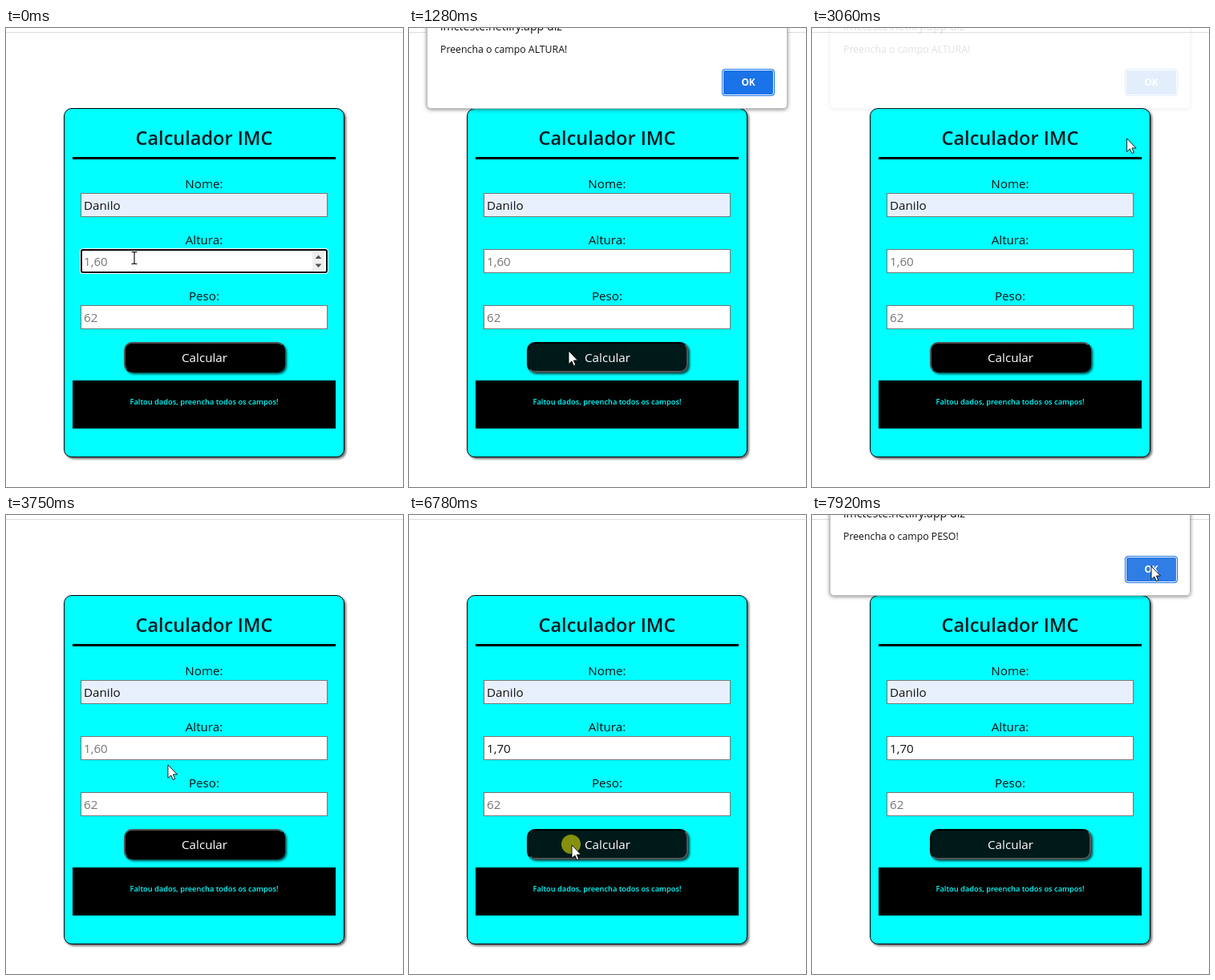
These frames come from a looping animation (495x573 px, 8000 ms). An HTML page:

```html
<!DOCTYPE html>
<html lang="pt-BR">
<head>
<meta charset="utf-8">
<title>Calculador IMC</title>
<style>
html, body { margin: 0; width: 100%; height: 100%; overflow: hidden; background: #fff; }
#stage { position: relative; width: 495px; height: 573px; overflow: hidden;
  font: 15.2px "Open Sans", "Noto Sans", sans-serif; color: #111; }
#stage div, #stage svg { position: absolute; box-sizing: border-box; white-space: pre; }
#topLine { top: 5px; width: 495px; height: 1px; background: #ddd; }
#card { left: 72px; top: 100px; width: 350px; height: 436px; background: #0ff;
  border: 1px solid #000; border-radius: 10px; box-shadow: 2px 2px 3px #0009; }
.center { left: 72px; width: 350px; text-align: center; line-height: 20px; }
#title { top: 127px; font-size: 23.5px; font-weight: 600; color: #0b1a20; }
#rule { left: 83px; top: 161px; width: 328px; height: 3px; background: #000; }
.field { left: 93px; width: 308px; height: 30px; border: 1px solid #767676;
  padding-left: 3px; line-height: 28px; background: #fff; }
.field.focus { border: 2px solid #000; padding-left: 2px; line-height: 26px;
  border-radius: 3px; box-shadow: 0 0 0 1px #fff; }
.hint { color: #757575; }
#caret { display: inline-block; width: 1px; height: 20px; margin-right: -1px;
  background: #000; vertical-align: middle; }
.spinner { left: 382px; width: 15px; height: 24px; }
#button { left: 147px; top: 392px; width: 201px; height: 38px; border: 2px outset #000;
  border-radius: 10px; background: #000; color: #fff; text-align: center;
  line-height: 34px; box-shadow: 2px 2px 3px #000b; }
#button.pressed { border-style: inset; background: #001a1a; }
#result { left: 83px; top: 440px; width: 328px; height: 60px; background: #000; color: #0ff;
  text-align: center; font-size: 9.3px; font-weight: 600; line-height: 54px; }
#dialog { left: 22px; top: -40px; width: 450px; height: 141px; background: #fff;
  border: 1px solid #bbb; border-radius: 5px; box-shadow: 0 1px 5px #0007; }
#dialog div { left: 16px; line-height: 20px; }
#site { top: 27px; font-size: 14.2px; }
#alertText { top: 56px; font-size: 12.3px; }
#stage #ok { left: 367px; top: 90px; width: 66px; height: 34px; border: 1.5px solid #1a73e8;
  border-radius: 4px; box-shadow: inset 0 0 0 1px #fff; background: #1a73e8; color: #fff;
  text-align: center; font-size: 11.8px; font-weight: 700; line-height: 31px; }
#stage #ok.hover { background: #2f7de5; }
#pointer { left: 0; top: 0; width: 495px; height: 573px; }
</style>
</head>
<body>
<div id="stage">
  <div id="topLine"></div>
  <div id="card"></div>
  <div class="center" id="title">Calculador IMC</div>
  <div id="rule"></div>
  <div class="center" style="top:184px">Nome:</div>
  <div class="field" style="top:206px;background:#e8f0fe">Danilo</div>
  <div class="center" style="top:254px">Altura:</div>
  <div class="field" id="height" style="top:276px"><span id="typed"></span><i id="caret"></i><span class="hint" id="heightHint">1,60</span></div>
  <div class="center" style="top:324px">Peso:</div>
  <div class="field hint" style="top:346px">62</div>
  <svg class="spinner" id="heightSpinner" style="top:279px" viewBox="0 0 15 24"><path fill="#efefef" d="M0 0H15V24H0Z"/><path fill="#505050" d="M3.5 9L7.5 4.5 11.5 9ZM3.5 15.5L7.5 20 11.5 15.5Z"/></svg>
  <svg class="spinner" id="weightSpinner" style="top:349px" viewBox="0 0 15 24"><path fill="#efefef" d="M0 0H15V24H0Z"/><path fill="#505050" d="M3.5 9L7.5 4.5 11.5 9ZM3.5 15.5L7.5 20 11.5 15.5Z"/></svg>
  <div id="button">Calcular</div>
  <div id="result">Faltou dados, preencha todos os campos!</div>
  <div id="dialog">
    <div id="site">imcteste.netlify.app diz</div>
    <div id="alertText"></div>
    <div id="ok">OK</div>
  </div>
  <svg id="pointer" viewBox="0 0 495 573">
    <g id="cursor">
      <circle id="click" cx="-1" cy="-1" r="12" fill="#ff0" fill-opacity=".52"/>
      <path id="arrow" d="M0 0V16.5L3.8 13 6.3 18.6 8.8 17.5 6.4 12H11.5Z" fill="#fff" stroke="#000" stroke-width=".9"/>
      <path id="beam" d="M-3.5 -7.5H-1L0 -6.5 1 -7.5H3.5M0 -6.5V6.5M-3.5 7.5H-1L0 6.5 1 7.5H3.5" fill="none" stroke="#000" stroke-width="1.1"/>
    </g>
  </svg>
</div>
<script>
const LOOP = 8000;
const $ = id => document.getElementById(id);
const show = (id, on) => { $(id).style.visibility = on ? "visible" : "hidden"; };
const between = (t, from, to) => t >= from && t < to;
const ramp = (t, from, to) => Math.min(1, Math.max(0, (t - from) / (to - from)));

// Pointer path: time, x, y
const path = [
  [0, 160, 287], [400, 160, 287], [980, 199, 403], [1940, 199, 403],
  [2300, 242, 293], [2560, 358, 88], [2720, 417, 62], [2920, 417, 62],
  [3180, 372, 202], [3480, 246, 368], [3600, 240, 352], [3750, 202, 312],
  [3880, 192, 303], [4020, 175, 291], [5940, 175, 291], [6200, 182, 334],
  [6300, 189, 353], [6560, 204, 421], [6690, 203, 412], [7050, 203, 412],
  [7400, 330, 200], [7580, 396, 103], [7920, 423, 64], [LOOP, 423, 64]
];
const keys = [[4610, "1"], [5010, ","], [5740, "7"], [5940, "0"]];

function pointerAt(t) {
  const i = path.findIndex(p => p[0] > t);
  const [t0, x0, y0] = path[i - 1], [t1, x1, y1] = path[i];
  const k = ramp(t, t0, t1);
  return [x0 + (x1 - x0) * k, y0 + (y1 - y0) * k];
}

function render(t) {
  const [x, y] = pointerAt(t);
  const modal = between(t, 1080, 2960) || t >= 6850;
  const inField = top => !modal && x > 93 && x < 401 && between(y, top, top + 30);
  const focused = t < 1010 || between(t, 4220, 6780);
  const pressed = between(t, 1010, 3000) || t >= 6780;
  const beam = [206, 276, 346].some(inField);

  const done = keys.filter(k => k[0] <= t);
  $("typed").textContent = done.map(k => k[1]).join("");
  $("heightHint").textContent = done.length ? "" : "1,60";
  const lastInput = done.length ? done[done.length - 1][0] : 4220;
  show("caret", between(t, 4220, 6780) && Math.floor((t - lastInput) / 530) % 2 === 0);

  $("height").classList.toggle("focus", focused);
  show("heightSpinner", focused || inField(276));
  show("weightSpinner", inField(346));
  $("button").classList.toggle("pressed", pressed);

  $("dialog").style.opacity = t < 5000
    ? ramp(t, 1080, 1270) * (1 - ramp(t, 2920, 3080))
    : ramp(t, 6840, 7030);
  $("alertText").textContent = `Preencha o campo ${t < 5000 ? "ALTURA" : "PESO"}!`;
  $("ok").classList.toggle("hover", modal && x > 390 && x < 456 && between(y, 51, 85));

  $("cursor").setAttribute("transform", `translate(${x} ${y})`);
  show("arrow", !beam);
  show("beam", beam);
  show("click", [[1010, 1090], [2790, 2920], [4220, 4280], [6780, 6850]]
    .some(([from, to]) => between(t, from, to)));
}

const start = performance.now();
function tick() {
  render((performance.now() - start) % LOOP);
  requestAnimationFrame(tick);
}
tick();
</script>
</body>
</html>
```
